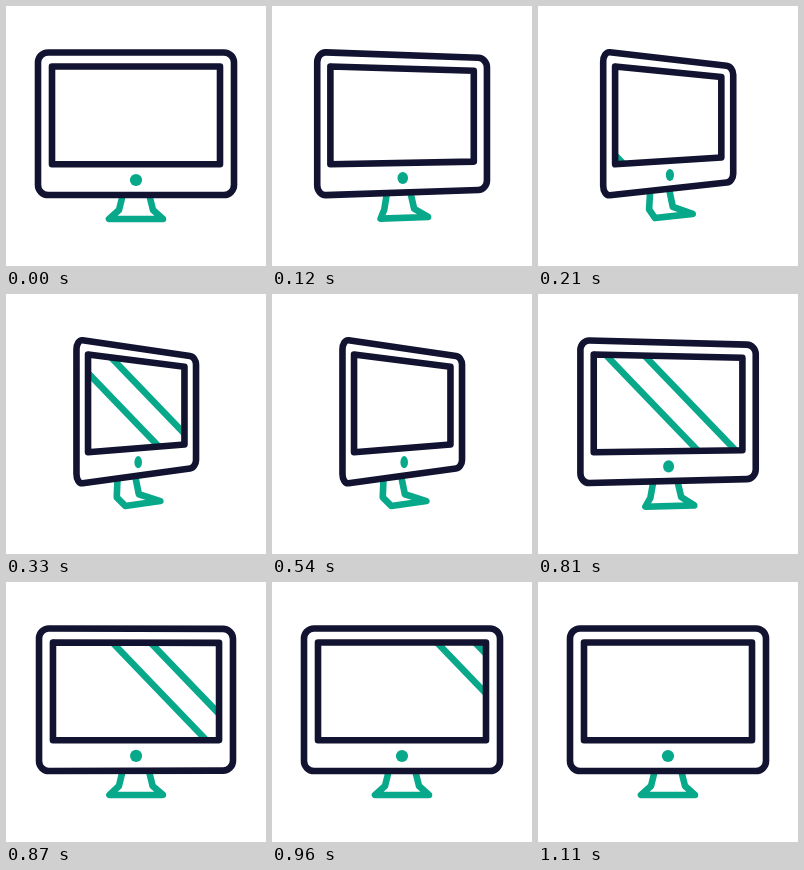
An HTML page for the animation above (1200 ms loop, 260 by 260 pixels).

```html
<!DOCTYPE html>
<html lang="en">
<head>
<meta charset="utf-8">
<title>Turning monitor</title>
<style>
html, body { margin: 0; width: 100%; height: 100%; overflow: hidden; background: #fff; }
svg { display: block; width: 100vw; height: 100vh; }
path { fill: none; stroke-width: 6.6; stroke-linecap: round; stroke-linejoin: round; }
.dark { stroke: #121331; }
.green { stroke: #08a88a; }
#dot { fill: #08a88a; }
</style>
</head>
<body>
<svg viewBox="0 0 260 260">
  <clipPath id="clip"><path id="mask"/></clipPath>
  <path id="stand" class="green"/>
  <g clip-path="url(#clip)"><path id="shine" class="green"/></g>
  <path id="body" class="dark"/>
  <path id="screen" class="dark"/>
  <ellipse id="dot"/>
</svg>
<script>
const LOOP = 1200, STEP = 30, LAST = 1110;
const CX = 130, HORIZON = 120;
const BODY_SQUEEZE = 0.61, SCREEN_SQUEEZE = 0.574;
const $ = id => document.getElementById(id);
const path = (id, d) => $(id).setAttribute('d', d);

const clamp = x => Math.min(1, Math.max(0, x));
const ease = x => { x = clamp(x); return x * x * (3 - 2 * x); };
const mix = (a, b, p) => a + (b - a) * p;

// Turns a point of the front view by p (0 to 1): narrower, and smaller to the right.
const turn = (p, squeeze) => (x, y) => {
  const u = x - CX, scale = 0.897 - 0.00121 * u;
  return [mix(x, CX + 0.25 + u * squeeze, p), mix(y, HORIZON + (y - HORIZON) * scale, p)].join(' ');
};

function box(at, left, top, right, bottom, r = 0) {
  const corners = [[left, top, 1, 1], [right, top, -1, 1], [right, bottom, -1, -1], [left, bottom, 1, -1]];
  const parts = corners.map(([x, y, sx, sy], i) => {
    const along = k => at(x + sx * r * k, y);
    const down = k => at(x, y + sy * r * k);
    const [a, b] = i % 2 ? [along, down] : [down, along];
    return a(1) + 'C' + [a(0.45), b(0.45), b(1)].join(',');
  });
  return 'M' + parts.join('L') + 'Z';
}

// Levels of the stand: half width, height, then sideways shift and lift when turned.
const levels = [[14, 192, -9.5, 6.5], [17, 204, -8.2, 2.2], [27, 213, 6.8, 3.5]];

function stand(p) {
  const side = s => levels.map(([half, y, shift, lift]) => {
    const u = s * half;
    return [CX + mix(u, shift + 0.65 * u, p), y - p * (lift + 0.09 * u)].join(' ');
  });
  return 'M' + [...side(-1), ...side(1).reverse()].join('L');
}

// Diagonal stripe that crosses mid-screen height at x.
const stripe = x => `M${x - 80} 26.8L${x + 80} 193.2`;

function draw(t) {
  const p = ease((t - 25) / 241) - ease((t - 648) / 246);
  const face = box(turn(p, SCREEN_SQUEEZE), 46, 60.5, 214, 158.3);
  const lead = t < 555 ? 39.5 + 0.92 * (t - 210) : 94.5 + 0.65 * (t - 720);
  path('body', box(turn(p, BODY_SQUEEZE), 32, 46.5, 228, 189, 10));
  path('screen', face);
  path('mask', face);
  path('stand', stand(p));
  path('shine', stripe(lead) + stripe(lead - 38));
  const dot = { cx: CX + 2.2 * p, cy: 174 - 5.8 * p, rx: 6.1 * mix(1, 0.62, p), ry: 6.1 };
  for (const k in dot) $('dot').setAttribute(k, dot[k]);
}

function tick() {
  const t = performance.now() % LOOP;
  draw(Math.min(LAST, Math.floor(t / STEP) * STEP));
  requestAnimationFrame(tick);
}
tick();
</script>
</body>
</html>
```
